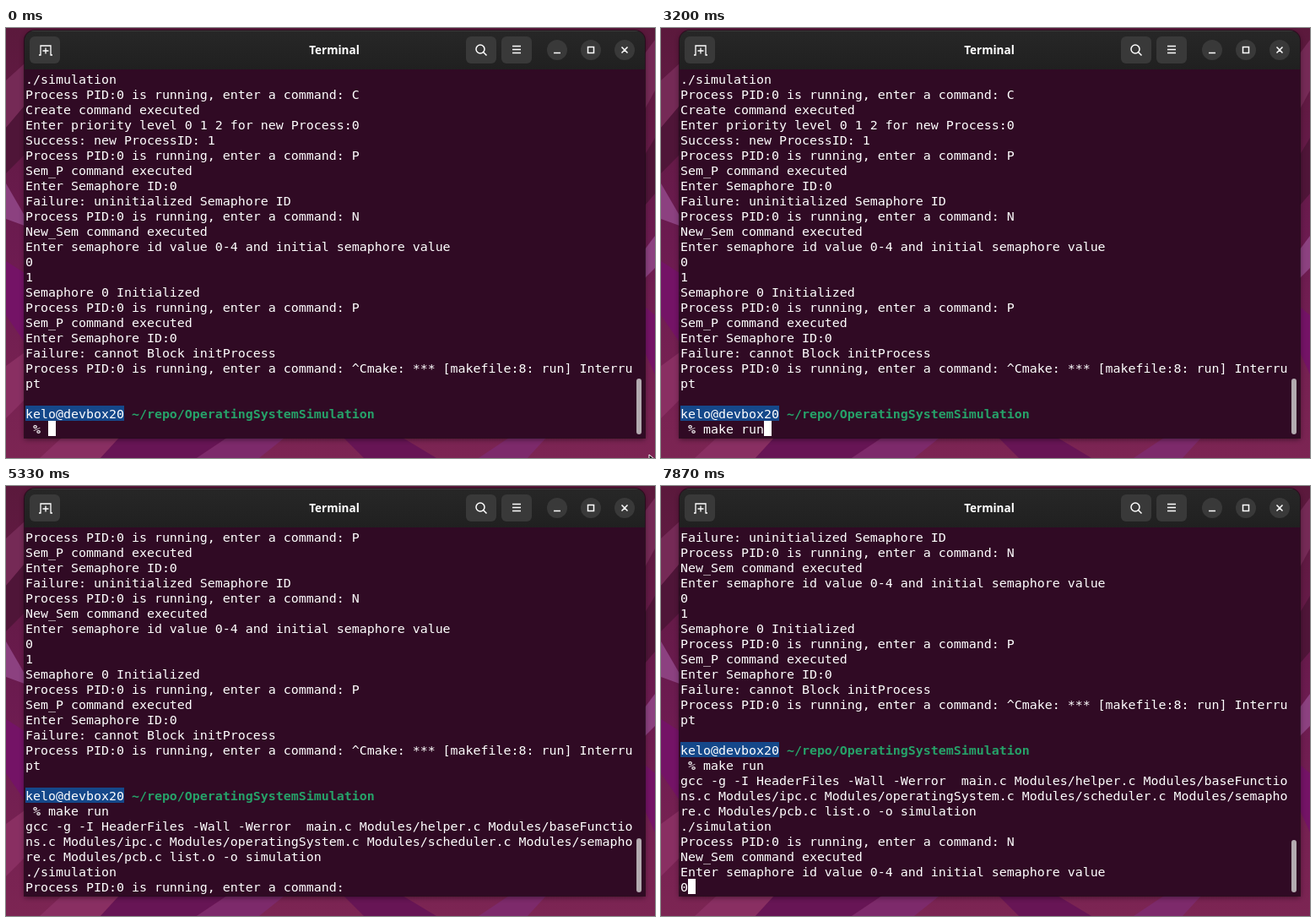
An HTML page that plays this animation: 769 px wide and 509 px high, repeating every 8000 ms.

```html
<!DOCTYPE html>
<html lang="en">
<head>
<meta charset="utf-8">
<title>Terminal</title>
<style>
html, body { margin: 0; width: 100%; height: 100%; overflow: hidden; background: #6e1f4c; }
svg, pre, div { position: absolute; }
svg { left: 0; top: 0; }
#window { left: 22px; top: 3px; width: 735px; height: 482px; background: #300a24;
  border-radius: 12px 12px 0 0; box-shadow: 0 0 0 1px #1b0914b0, 0 2px 6px #0007; overflow: hidden; }
#bar { width: 100%; height: 46px; background: linear-gradient(#272727, #202020); box-shadow: inset 0 1px #3a3a3a; }
#title { left: 0; width: 734px; top: 11px; text-align: center; color: #fff;
  font: bold 13.5px/24px "Noto Sans", sans-serif; }
#text { left: 23px; top: 52px; margin: 0; color: #fff; font: 14.95px/18px "DejaVu Sans Mono", monospace; }
#text b { color: #26a269; }
#text i { color: #e4dfe2; font-style: normal; font-weight: bold; }
#selection { left: 23px; width: 117px; height: 18px; background: #15488a; }
#caret { width: 9px; height: 18px; background: #fff; }
#scroll { left: 747px; width: 6px; border-radius: 3px; background: #b3abb0; }
</style>
</head>
<body>
<svg width="769" height="509">
  <defs>
    <linearGradient id="wall" x2="0" y2="1">
      <stop stop-color="#5b193c"/><stop offset=".5" stop-color="#6c1b50"/><stop offset="1" stop-color="#7c2553"/>
    </linearGradient>
  </defs>
  <path fill="url(#wall)" d="M0 0h769v509H0z"/>
  <path fill="#752a56" d="M0 62L22 42V92L0 118zM757 30l12-16v60l-12 22z"/>
  <path fill="#4f1538" d="M0 118L22 92V150L0 172zM757 150l12-20v66l-12 14z"/>
  <path fill="#8c4180" d="M0 184L22 222V234L0 226zM757 262l12-16v38l-12 12z"/>
  <path fill="#741366" d="M0 276L22 290V372L0 340zM757 330l12 10v70l-12-26z"/>
  <path fill="#892f62" d="M0 400L22 384V440L0 462zM40 509L66 485H134L112 509z"/>
  <path fill="#671555" d="M134 485H262L226 509H112zM400 485H470L510 509H424z"/>
  <path fill="#7d2a6b" d="M262 485H330L300 509H226zM560 509L596 485H640L618 509z"/>
</svg>
<div id="window"><div id="bar"></div><div id="title">Terminal</div></div>
<svg width="769" height="509" fill="none" stroke="#fff" stroke-width="1.5">
  <g fill="#393939" stroke="none">
    <rect x="28" y="10" width="36" height="32" rx="6"/>
    <rect x="545" y="10" width="36" height="32" rx="6"/>
    <rect x="587" y="10" width="36" height="32" rx="6"/>
    <circle cx="653" cy="26" r="12"/><circle cx="693" cy="26" r="12"/><circle cx="733" cy="26" r="12"/>
  </g>
  <path d="M39 32h2V21h12v11h2M47 23.500v7M43.500 27h7" stroke-width="1.300"/>
  <circle cx="562" cy="25" r="5"/>
  <path d="M565.500 28.500l4 4M600 21.500h10M600 25.500h10M600 29.500h10M649 29.500h8M729.500 22.500l7 7m0-7l-7 7"/>
  <path d="M689.500 22.500h7v7h-7z"/>
</svg>
<div id="selection"></div>
<pre id="text"></pre>
<div id="caret"></div>
<div id="scroll"></div>
<svg width="769" height="509">
  <path id="arrow" fill="#111" stroke="#fff" d="M0 0v15l4-4 3 6 3-1-3-6h5z"/>
  <g id="beam" fill="none">
    <path stroke="#000" stroke-width="3" d="M-3-4.500H3M0-4.500V4.500M-3 4.500H3"/>
    <path stroke="#fff" stroke-width="1.300" d="M-2.500-4.500H2.500M0-4.500V4.500M-2.500 4.500H2.500"/>
  </g>
</svg>
<script>
const LOOP = 8000, TICK = 200 / 3, ROWS = 24, ROW = 18, COL = 9, LEFT = 23, TOP = 51;
const PROMPT_LINE = 22;
const ask = 'Process PID:0 is running, enter a command: ';
const newSem = 'New_Sem command executed\nEnter semaphore id value 0-4 and initial semaphore value\n';
const semP = 'P\nSem_P command executed\nEnter Semaphore ID:0\nFailure: ';

const history = `./simulation
${ask}C
Create command executed
Enter priority level 0 1 2 for new Process:0
Success: new ProcessID: 1
${ask}${semP}uninitialized Semaphore ID
${ask}N
${newSem}0
1
Semaphore 0 Initialized
${ask}${semP}cannot Block initProcess
${ask}^Cmake: *** [makefile:8: run] Interru
pt

kelo@devbox20 ~/repo/OperatingSystemSimulation
 % `;

const gcc = `
gcc -g -I HeaderFiles -Wall -Werror  main.c Modules/helper.c Modules/baseFunctio
ns.c Modules/ipc.c Modules/operatingSystem.c Modules/scheduler.c Modules/semapho
re.c Modules/pcb.c list.o -o simulation
`;

// Everything appended to the terminal: [time, text]
const keyTimes = [2470, 2530, 2670, 2730, 2870, 2930, 3070, 3200];
const output = [
  ...keyTimes.map((time, i) => [time, 'make run'[i]]),
  [3530, gcc],
  [3800, './simulation\n' + ask],
  [6270, 'N'],
  [6600, '\n' + newSem],
  [7870, '0'],
];
const caretOff = [[670, 1270], [1870, 2470], [4070, 4730], [5330, 6000], [7200, 7800]];

const el = id => document.getElementById(id);
const show = (node, on) => { node.style.visibility = on ? 'visible' : 'hidden'; };
const move = (node, x, y) => node.setAttribute('transform', `translate(${x} ${y})`);
const text = el('text'), caret = el('caret'), selection = el('selection'),
  scroll = el('scroll'), arrow = el('arrow'), beam = el('beam');
let shown;

function drawTerminal(t) {
  const log = history + output.filter(([time]) => time <= t).map(part => part[1]).join('');
  show(caret, !caretOff.some(([from, to]) => t >= from && t < to));
  if (log === shown) return;
  shown = log;
  const lines = log.split('\n');
  const first = lines.length - ROWS;
  text.innerHTML = lines.slice(first).join('\n')
    .replace(/~\/repo\S+/, '<b>$&</b>')
    .replace(/^ %/m, '<i>$&</i>');
  caret.style.left = LEFT + COL * lines.at(-1).length + 'px';
  caret.style.top = TOP + ROW * (ROWS - 1) + 'px';
  selection.style.top = TOP + ROW * (PROMPT_LINE - first) + 'px';
  const thumb = 415 + 2 * Math.floor(first / 4);
  scroll.style.top = thumb + 'px';
  scroll.style.height = 481 - thumb + 'px';
}

function drawPointer(t) {
  show(arrow, t < 130);
  move(arrow, t < 70 ? 762 : 757, t < 70 ? 505 : 506);
  show(beam, t >= 270 && t < 2470);
  if (t >= 1330 && t < 2400) return move(beam, 222, 464.5);
  const step = Math.floor((t + 4) / TICK) - 4;
  const rest = (1 - Math.min(1, Math.max(0, step / 8))) ** 2;
  move(beam, 231 + 265 * rest, 465 - 36 * rest);
}

function frame() {
  const t = performance.now() % LOOP;
  drawTerminal(t);
  drawPointer(t);
  requestAnimationFrame(frame);
}
frame();
</script>
</body>
</html>
```
